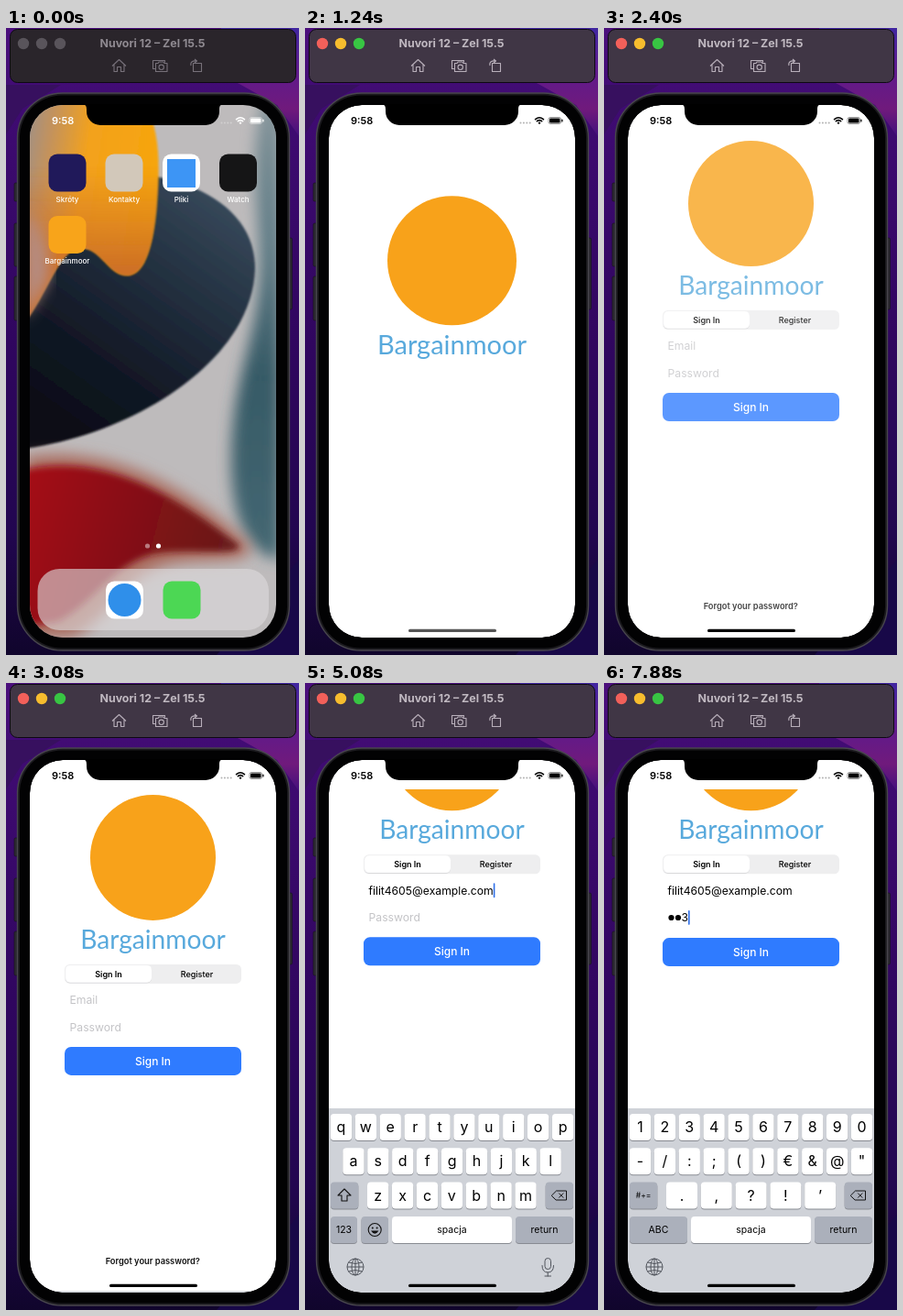
Recreate the animation shown at these times as an HTML page. Size 320 by 684 pixels, loop 8 s.

```html
<!DOCTYPE html>
<html lang="en">
<head>
<meta charset="utf-8">
<title>Sign in demo</title>
<style>
  html, body { margin: 0; width: 100%; height: 100%; overflow: hidden; background: #1c0840; }
  svg { display: block; width: 100vw; height: 100vh; }
  text { font-family: Inter, "Liberation Sans", sans-serif; }
  .mid { text-anchor: middle; }
  .brand { font-family: Lato, "Open Sans", sans-serif; }
</style>
</head>
<body>
<svg id="stage" viewBox="0 0 320 684"></svg>
<script>
const LOOP = 8000;
const BRAND = 'Bargainmoor';
const EMAIL = 'filit4605@example.com';
const SCREEN = { x: 26, y: 84, w: 269, h: 581, r: 36 };

const rect = (x, y, w, h, r, fill, extra = '') =>
  `<rect x="${x}" y="${y}" width="${w}" height="${h}" rx="${r}" fill="${fill}" ${extra}/>`;
const circle = (x, y, r, fill, extra = '') =>
  `<circle cx="${x}" cy="${y}" r="${r}" fill="${fill}" ${extra}/>`;
const path = (d, fill, extra = '') => `<path d="${d}" fill="${fill}" ${extra}/>`;
const line = (d, color, width = 1) =>
  path(d, 'none', `stroke="${color}" stroke-width="${width}" stroke-linecap="round" stroke-linejoin="round"`);
const text = (x, y, size, fill, str, extra = '') =>
  `<text x="${x}" y="${y}" font-size="${size}" fill="${fill}" ${extra}>${str}</text>`;
const label = (x, y, size, fill, str, extra = '') => text(x, y, size, fill, str, `class="mid" ${extra}`);
const gradient = (id, coords, ...stops) => `<linearGradient id="${id}" ${coords}>` +
  stops.map(([at, color]) => `<stop offset="${at}" stop-color="${color}"/>`).join('') + '</linearGradient>';
const blur = (id, dev) =>
  `<filter id="${id}" x="-30%" y="-30%" width="160%" height="160%"><feGaussianBlur stdDeviation="${dev}"/></filter>`;

function defs() {
  return `<defs>
    ${gradient('desk', 'x2="0" y2="1"', [0, '#4b0f7c'], [.12, '#3f0b72'], [.5, '#30065f'], [.8, '#220650'], [1, '#10052c'])}
    ${gradient('deskRight', 'x2="0" y2="1"', [0, '#4026a0'], [.35, '#5c1a8e'], [.75, '#701a7c'], [1, '#42107c'])}
    ${gradient('orange', 'x2="1" y2=".25"', [0, '#98918f'], [.22, '#c3925d'], [.5, '#f3a21c'], [1, '#f6a50d'])}
    ${gradient('ember', 'x2="0" y2="1"', [.3, 'rgba(205,110,40,0)'], [.75, 'rgba(200,105,40,.85)'])}
    ${gradient('navy', 'x1=".9" y1="0" x2=".3" y2="1"', [0, '#3c4f61'], [.35, '#263444'], [.75, '#111724'], [1, '#0b0e17'])}
    ${gradient('red', 'x2="1" y2=".2"', [0, '#a60a12'], [.45, '#8b0c12'], [1, '#6a1a1a'])}
    ${gradient('teal', 'x2="0" y2="1"', [0, '#84949a'], [.3, '#5f7c86'], [.6, '#365a66'], [1, '#456873'])}
    ${blur('soft', 1)}${blur('medium', 3.5)}${blur('softer', 8)}
    <filter id="iconBlur" x="-10%" y="-10%" width="120%" height="120%"><feGaussianBlur id="iconDev" stdDeviation="0"/></filter>
    <clipPath id="screenClip">${rect(SCREEN.x, SCREEN.y, SCREEN.w, SCREEN.h, SCREEN.r, '#000')}</clipPath>
    <clipPath id="cardClip"><rect id="cardMask"/></clipPath>
    <clipPath id="scrollClip"><rect x="26" y="116" width="269" height="549"/></clipPath>
  </defs>`;
}

function desktop() {
  return rect(0, 0, 320, 684, 0, 'url(#desk)') +
    path('M235 0H320V118L296 84L235 50Z', 'url(#deskRight)') +
    path('M0 62H60L18 88L0 116Z', '#37105f') +
    path('M320 580V684H230Z', '#180848');
}

function toolbar() {
  const lights = ['#f2605a', '#f7bd2e', '#38c543'];
  return rect(4.5, 1.5, 312, 58, 8, '#2a252b', 'id="bar" stroke="#0d0913"') +
    lights.map((c, i) => circle(19 + i * 20, 17, 6.2, '#59545b', `class="light" data-on="${c}"`)).join('') +
    label(160, 21, 12.4, '#8f8a91', 'Nuvori 12 – Zel 15.5', 'id="title" font-weight="700"') +
    `<g id="tools" stroke="#77717a" fill="none" stroke-width="1.1" stroke-linejoin="round">
      <path d="M116 41.5L123.5 34.5L131 41.5M118 40V47.5H121.5V42.5H125.5V47.5H129V40"/>
      <path d="M163 44.5H160.5V35.5H173.5V37.5M163.5 38.5H166L167 37H172L173 38.5H176V47.5H163.5Z"/>
      <circle cx="169.7" cy="42.8" r="2.7"/>
      <path d="M204.5 38.5H213.5V47.5H204.5ZM202 41C201 37 204 35.5 208 36M206 34L208.5 36L206 38"/>
    </g>`;
}

function phoneBody() {
  const side = (x, y, h) => rect(x, y, 5, h, 1.5, '#2b2930', 'stroke="#15131a" stroke-width=".6"');
  return side(9, 169, 20) + side(9, 213, 47) + side(9, 271, 48) + side(307.5, 229, 78) +
    rect(12.5, 71, 297, 608, 49, '#1b1a1e', 'stroke="#48464d" stroke-width="1.4"') +
    rect(15, 73.5, 292, 603, 46, '#020203');
}

const notch = () =>
  path('M84 83H237C234 84 233 85 233 89V91A15 15 0 0 1 218 106H103A15 15 0 0 1 88 91V89C88 85 87 84 84 83Z', '#000');

function statusBar(color) {
  const cell = [0, 1, 2, 3].map(i => circle(235.5 + i * 3.4, 103.5, 1, color, 'opacity=".3"')).join('');
  return text(50, 105, 11, color, '9:58', 'font-weight="600"') + cell +
    line('M251.6 99.7Q256 95.8 260.4 99.7M253.4 101.7Q256 99.5 258.6 101.7', color, 1.6) +
    circle(256, 103.6, 1.2, color) +
    rect(266, 97.5, 13.5, 7, 2, 'none', `stroke="${color}" stroke-width=".7" opacity=".6"`) +
    rect(267, 98.5, 11.5, 5, 1.2, color) + rect(280.3, 99.6, 1.2, 3, .6, color);
}

function wallpaper() {
  const tongue = 'M20 78H150C169 112 168 150 165 190C161 242 150 270 132 270C112 270 104 240 82 240C58 240 45 290 20 322Z';
  return rect(26, 84, 269, 581, 0, '#bebbbc') +
    path('M300 75H281C262 150 280 215 277 270C274 340 244 390 246 480C248 545 268 575 300 580Z', 'url(#teal)', 'filter="url(#softer)"') +
    path('M20 240H110L150 160C215 168 272 202 272 262C270 362 140 443 20 459Z', 'url(#navy)', 'filter="url(#soft)"') +
    path(tongue, 'url(#orange)', 'filter="url(#soft)"') + path(tongue, 'url(#ember)', 'filter="url(#soft)"') +
    path('M20 200C40 215 50 245 46 275L20 318Z', '#b58b80', 'filter="url(#softer)"') +
    path('M20 468C120 452 205 508 264 562C280 590 205 574 168 588C125 602 110 650 70 665H20Z', '#a9695c', 'filter="url(#softer)"') +
    path('M20 482C110 463 188 512 254 564C258 578 195 566 160 574C115 586 92 632 55 648L20 652Z', 'url(#red)', 'filter="url(#medium)"');
}

function homeIcons() {
  const tile = (cx, cy, fill) => rect(cx - 20.5, cy - 20.5, 41, 41, 9.5, fill);
  const apps = [
    [67, 158, '#20195a', 'Skróty'], [129, 158, '#d2c8ba', 'Kontakty'],
    [191.5, 158, '#fff', 'Pliki'], [253.5, 158, '#151516', 'Watch'], [67, 225.5, '#f8a41a', BRAND]
  ];
  return rect(34.5, 590, 252.5, 67, 24, '#dedadb', 'opacity=".62"') +
    apps.map(([x, y, fill, name]) => tile(x, y, fill) + label(x, y + 31.5, 8, '#fff', name, 'font-weight="500"')).join('') +
    rect(176, 143, 31, 31, 0, '#3d95f5') +
    tile(129.5, 624, '#fff') + circle(129.5, 624, 18, '#2f8fea') + tile(192, 624, '#4cd754') +
    circle(154.5, 565, 2.6, '#fff', 'opacity=".45"') + circle(166.5, 565, 2.6, '#fff');
}

const logo = (x, y) => circle(x, y, 70.5, '#f8a21a') +
  `<text class="mid brand" x="${x}" y="${y + 102}" font-size="29" fill="#58a9dc">${BRAND}</text>`;

function login() {
  return `<g id="login" clip-path="url(#scrollClip)"><g id="scroll">
    <g transform="translate(160.5 191.5) scale(.972)">${logo(0, 0)}</g>
    ${rect(64, 308, 193, 21, 5.5, '#eeeeef')}
    ${rect(65, 309.6, 94, 19, 5, '#d9d9db')}${rect(65, 309, 94, 18.8, 5, '#fff')}
    ${label(112, 321.7, 9, '#000', 'Sign In', 'font-weight="600"')}
    ${label(208.5, 321.7, 9, '#000', 'Register', 'font-weight="500"')}
    ${text(69.5, 351.3, 12.2, '#c4c4c7', 'Email', 'id="email"')}
    ${text(69.5, 380.8, 12.2, '#c4c4c7', 'Password', 'id="password"')}
    <g id="dots">${[0, 1].map(i => circle(73.5 + i * 7.5, 376.7, 3.1, '#000')).join('')}</g>
    <g id="button">${rect(64, 398, 193, 31, 7, '#2f7bff')}
    ${label(160.5, 417.8, 12, '#fff', 'Sign In', 'font-weight="500"')}</g>
    ${rect(0, 0, 1.6, 16, .8, '#2f6fe8', 'id="caret"')}
    <g id="menu">${rect(46, 302, 49, 30, 6, '#2b2b2e')}${path('M64 331.5H76L70 338Z', '#2b2b2e')}
    ${label(70.5, 320.7, 10, '#fff', 'Paste')}</g>
  </g>${label(160.3, 634, 9.3, '#111', 'Forgot your password?', 'font-weight="600"')}</g>`;
}

const ROW_Y = [470, 507.3, 544.6, 582];
const keyCap = (x, row, w, fill = '#fff') =>
  rect(x, ROW_Y[row] + 1, w, 29, 4, '#888b92') + rect(x, ROW_Y[row], w, 29, 4, fill);
const key = (x, row, w, str, size = 16, fill) =>
  keyCap(x, row, w, fill) + label(x + w / 2, ROW_Y[row] + 14.5 + size * .35, size, '#000', str);
const keyRow = (chars, row, x, w = 23.3, pitch = 26.9) =>
  [...chars].map((c, i) => key(x + i * pitch, row, w, c === '&' ? '&amp;' : c)).join('');

function keyboard() {
  const grey = '#abb0bb';
  const common = keyCap(262.7, 2, 30.3, grey) +
    line('M269.5 559L274.5 554H285.5V564H274.5ZM277.5 556.8L282 561.3M282 556.8L277.5 561.3', '#111') +
    key(95, 3, 131, 'spacja', 10.5) + key(230, 3, 63, 'return', 10.5, grey) +
    `<g fill="none" stroke="#50545c"><circle cx="55" cy="637" r="9"/><ellipse cx="55" cy="637" rx="4" ry="9"/>
     <path d="M55 628V646M46 637H64M47.5 632Q55 635 62.5 632M47.5 642Q55 639 62.5 642"/></g>`;
  const letters = keyRow('qwertyuiop', 0, 27.8) + keyRow('asdfghjkl', 1, 41.3) + keyRow('zxcvbnm', 2, 68) +
    keyCap(28, 2, 30.3, grey) + line('M43 552L36 559H40V565H46V559H50Z', '#111', 1.1) +
    key(28, 3, 29, '123', 10.5, grey) + keyCap(61.5, 3, 29.5, grey) +
    circle(76.2, 596.5, 7, 'none', 'stroke="#111" stroke-width="1.1"') +
    circle(73.8, 594.5, 1, '#111') + circle(78.6, 594.5, 1, '#111') + path('M72 597.5H80.5Q76.2 604 72 597.5Z', '#111');
  const digits = keyRow('1234567890', 0, 27.8) + keyRow('-/:;()€&@"', 1, 27.8) +
    keyRow('.,?!’', 2, 68, 34, 37.8) + key(28, 2, 30.3, '#+=', 8.5, grey) + key(28, 3, 63, 'ABC', 10.5, grey);
  const mic = rect(262, 627.5, 6.5, 12, 3.2, 'none', 'stroke="#50545c"') +
    line('M259 635.5Q259 643 265.2 643Q271.5 643 271.5 635.5M265.2 643V647M262 647H268.5', '#50545c');
  return `<g id="keyboard">${rect(26, 464, 269, 215, 0, '#cfd2d8')}${common}
    <g id="letters">${letters}</g><g id="digits">${digits}</g><g id="mic">${mic}</g>
    <g id="popup"><path id="bubble" fill="#fff" stroke="#b9bcc3" stroke-width=".6"/>${label(0, 455, 23, '#000', '', 'id="popupText"')}</g></g>`;
}

document.getElementById('stage').innerHTML = defs() + desktop() + toolbar() + phoneBody() +
  `<g clip-path="url(#screenClip)">
    <g id="home">${wallpaper()}<g filter="url(#iconBlur)">${homeIcons()}</g>
      ${rect(26, 84, 269, 581, 0, '#000', 'id="dim"')}<g id="homeStatus">${statusBar('#fff')}</g></g>
    <g id="card"><g clip-path="url(#cardClip)"><rect id="cardBack" fill="#fff"/>
      <g id="cardBody"><g id="launch">${logo(160.5, 355)}</g>${login()}${keyboard()}
      ${statusBar('#000')}${rect(113, 655.8, 96, 3.2, 1.6, '#000', 'id="indicator"')}</g></g></g>
  </g>` + notch();

const el = {};
document.querySelectorAll('[id]').forEach(node => { el[node.id] = node; });
const lights = document.querySelectorAll('.light');

const ramp = (t, from, to) => Math.min(1, Math.max(0, (t - from) / (to - from)));
const easeOut = (u, power) => 1 - (1 - u) ** power;
const easeInOut = u => (1 - Math.cos(Math.PI * u)) / 2;
const mix = (a, b, p) => a + (b - a) * p;
const set = (node, attrs) => { for (const name in attrs) node.setAttribute(name, attrs[name]); };
const show = (node, on) => set(node, { visibility: on ? 'visible' : 'hidden' });
const within = (t, from, to) => t >= from && t < to;

const presses = [
  { digit: '1', down: 6920, up: 7000 },
  { digit: '2', down: 7280, up: 7400 },
  { digit: '3', down: 7760, up: 7880 }
];

function drawWindow(active) {
  lights.forEach(node => set(node, { fill: active ? node.dataset.on : '#59545b' }));
  set(el.bar, { fill: active ? '#403645' : '#2a252b' });
  set(el.title, { fill: active ? '#c0b9c1' : '#8f8a91' });
  set(el.tools, { stroke: active ? '#b8afba' : '#77717a' });
}

function drawCard(t) {
  const p = easeOut(ramp(t, 650, 1000), 2);
  const w = mix(40, SCREEN.w, p);
  const h = w * mix(1, SCREEN.h / SCREEN.w, p);
  const x = mix(67, 160.5, p) - w / 2;
  const y = mix(225, 374.5, p) - h / 2;
  const scale = w / SCREEN.w;
  const box = { x, y, width: w, height: h, rx: mix(10, SCREEN.r, easeOut(p, 2)) };
  set(el.cardMask, box);
  set(el.cardBack, box);
  set(el.cardBody, { transform: `translate(${x} ${y}) scale(${scale}) translate(${-SCREEN.x} ${-SCREEN.y})` });
  set(el.card, { opacity: ramp(t, 640, 720) });
  show(el.home, p < 1);
  set(el.iconDev, { stdDeviation: 4 * p });
  set(el.dim, { opacity: .47 * p });
  set(el.homeStatus, { opacity: 1 - .7 * p });
  set(el.indicator, {
    y: SCREEN.y + h / scale - 9.2,
    fill: t < 1000 ? '#bbb' : t < 1840 ? '#555' : '#000'
  });
  set(el.launch, { transform: `translate(0 ${-382 * easeInOut(ramp(t, 1000, 1700))})` });
  show(el.launch, t < 1700);
}

function drawFields(t) {
  const pasted = t >= 4800;
  const typed = presses.filter(p => t >= p.down + 40);
  const hidden = Math.max(0, typed.length - 1);

  el.email.textContent = pasted ? EMAIL : 'Email';
  set(el.email, { fill: pasted ? '#000' : '#c4c4c7' });
  el.password.textContent = typed.length ? typed[hidden].digit : 'Password';
  set(el.password, { fill: typed.length ? '#000' : '#c4c4c7', x: 69.5 + hidden * 7.5 });
  [...el.dots.children].forEach((dot, i) => show(dot, i < hidden));
  set(el.button, { transform: `translate(0 ${t >= 6920 ? .8 : 0})` });

  const onEmail = t < 5400;
  let caretX = 69.5;
  if (onEmail && pasted) caretX += el.email.getComputedTextLength();
  if (typed.length) caretX += hidden * 7.5 + el.password.getComputedTextLength();
  const glow = onEmail
    ? ramp(t, 3240, 3360) - ramp(t, 3760, 3960) + ramp(t, 4240, 4400)
    : ramp(t, 5360, 5480) - ramp(t, 5940, 6080) + ramp(t, 6260, 6400);
  set(el.caret, { x: caretX, y: onEmail ? 339 : 368.6, opacity: glow });
  set(el.menu, { opacity: ramp(t, 4220, 4480) - ramp(t, 4760, 5040) });
}

function drawKeyboard(t) {
  const numeric = t >= 6320;
  show(el.keyboard, t >= 3080);
  set(el.keyboard, { transform: `translate(0 ${201 * (1 - easeOut(ramp(t, 3080, 3560), 4))})` });
  set(el.letters, { display: numeric ? 'none' : 'inline' });
  set(el.digits, { display: numeric ? 'inline' : 'none' });
  set(el.mic, { display: t < 5400 ? 'inline' : 'none' });

  const press = presses.find(p => within(t, p.down, p.up));
  set(el.popup, { display: press ? 'inline' : 'none' });
  if (!press) return;
  const left = 27.8 + (press.digit - 1) * 26.9;
  const right = left + 23.3;
  const a = Math.max(27.5, left - 10);
  const b = right + 10;
  set(el.bubble, { d: `M${a + 6} 428H${b - 6}Q${b} 428 ${b} 434V456C${b} 464 ${right} 464 ${right} 472V495Q${right} 499 ${right - 4} 499H${left + 4}Q${left} 499 ${left} 495V472C${left} 464 ${a} 464 ${a} 456V434Q${a} 428 ${a + 6} 428Z` });
  set(el.popupText, { x: (a + b) / 2 });
  el.popupText.textContent = press.digit;
}

function render(t) {
  drawWindow(t >= 600);
  drawCard(t);
  set(el.login, { opacity: easeOut(ramp(t, 1960, 2760), 1.9) });
  set(el.scroll, { transform: `translate(0 ${-120.7 * easeOut(ramp(t, 3080, 3300), 2)})` });
  drawFields(t);
  drawKeyboard(t);
}

const start = performance.now();
function tick(now) {
  render(Math.max(0, now - start) % LOOP);
  requestAnimationFrame(tick);
}
render(0);
requestAnimationFrame(tick);
</script>
</body>
</html>
```
